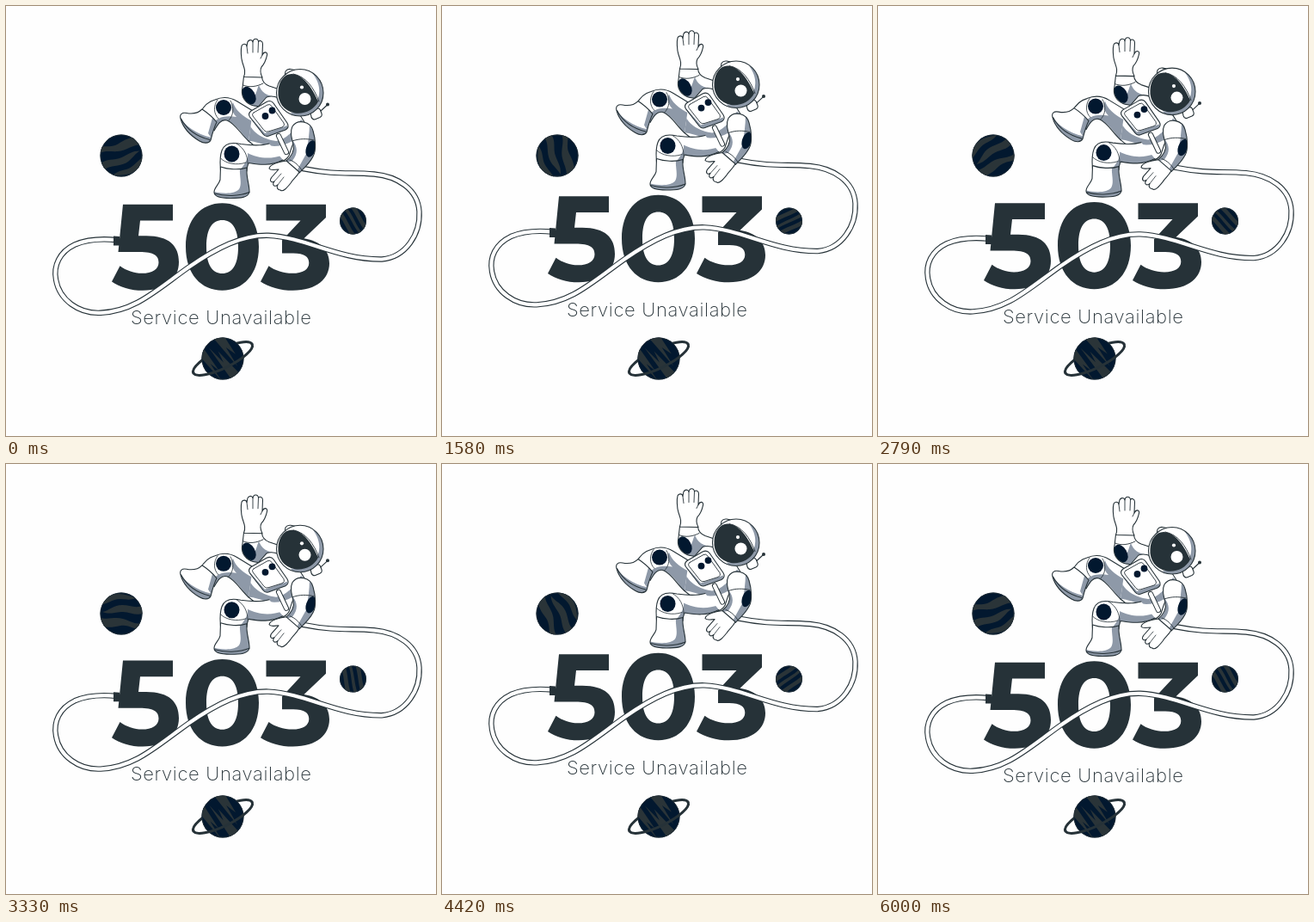
An HTML page with a canvas that plays this animation: 500 px wide and 500 px high, repeating every 6.04 s.

```html
<!DOCTYPE html>
<html lang="en">
<head>
<meta charset="utf-8">
<title>503</title>
<style>
html, body { margin: 0; width: 100%; height: 100%; overflow: hidden; background: #fefefe; }
canvas { display: block; width: 500px; height: 500px; }
</style>
</head>
<body>
<canvas id="stage"></canvas>
<script>
const canvas = document.getElementById('stage');
const ctx = canvas.getContext('2d');
const dpr = window.devicePixelRatio || 1;
canvas.width = canvas.height = 500 * dpr;

const LOOP = 6040, FLOAT = 3000, SPIN = 6000;
const INK = '#263238', NAVY = '#02182f', SHADE = '#8e99a8', WHITE = '#ffffff', PAPER = '#fefefe';
const TAU = Math.PI * 2, DEG = Math.PI / 180;

const cache = new Map();
function path(d) {
  if (!cache.has(d)) cache.set(d, new Path2D(d));
  return cache.get(d);
}

function fill(d, color) {
  ctx.fillStyle = color;
  ctx.fill(path(d), 'evenodd');
}

function line(d, width = 1.1, color = INK) {
  ctx.strokeStyle = color;
  ctx.lineWidth = width;
  ctx.stroke(path(d));
}

// White suit part with shading clipped to its outline; open paths stay unlined at the gap
function part(d, shade, inner) {
  fill(d, WHITE);
  ctx.save();
  ctx.clip(path(d));
  if (shade) fill(shade, SHADE);
  if (inner) inner();
  ctx.restore();
  line(d);
}

function oval(x, y, rx, ry, color, turn = 0) {
  ctx.beginPath();
  ctx.ellipse(x, y, rx, ry, turn * DEG, 0, TAU);
  ctx.fillStyle = color;
  ctx.fill();
}

function digits() {
  ctx.save();
  ctx.translate(0, 280);
  ctx.scale(1, 0.985);
  ctx.translate(0, -280);
  fill('M136 230H194V249H156L154 267H163C190 267 201 279 201 298C201 317 187 331.5 159 331.5C145 331.5 132 327.5 123 321L132.500 302.500C140 308 149 311.300 158 311.300C170 311.300 177.500 306.500 177.500 298.500C177.500 290.500 172.500 286 155 286H130.500Z', INK);
  fill('M251.500 228.500C276 228.500 294 247.500 294 280S276 331.500 251.500 331.500S209 312.500 209 280S227 228.500 251.500 228.500Z' +
       'M251.500 248.500C240.500 248.500 233 257.500 233 280S240.500 311.500 251.500 311.500S270 302.500 270 280S262.500 248.500 251.500 248.500Z', INK);
  fill('M302.500 230H372V245.500L346.500 270C366 273 376 284 376 299.500C376 317 362 331.500 333.500 331.500C319.500 331.500 305.500 327.500 296 321L305.500 302.500C313 308 322.500 311.300 333 311.300C345 311.300 352.300 306.700 352.300 299C352.300 291.500 347 287.500 334 287.500H321V272.500L342.500 249H302.500Z', INK);
  ctx.restore();
}

function caption() {
  ctx.font = '200 22px Inter, Lato, sans-serif';
  ctx.letterSpacing = '0.65px';
  ctx.textAlign = 'center';
  ctx.textBaseline = 'alphabetic';
  ctx.fillStyle = INK;
  ctx.fillText('Service Unavailable', 250.300, 370);
}

function cable() {
  const d = 'M128 272C112 270.500 95 271 80 277.500C62 286 55 302 58 318C62 342 85 358 110 356.800C150 355 175 330 212 304C245 281 275 266 305 266.800C350 269 385 295 437 294.500C465 292 482 265 480.500 239C479 213 455 198 428 195.500C400 193 385 197 345 189';
  line(d, 6.4);
  line(d, 4.2, WHITE);
  fill('M125 267.500L132 268V278.500H125Z', INK);
}

function raisedArm() {
  part('M276.500 82L297.500 82.500C298 88 301 91 306 93L321 98L309 118C300 116 292 118 285 115C276 111 273 103 275 95Z',
    'M278 112C290 112 291 98 294 92C297 100 303 105 316 106L312 121L278 118Z',
    () => oval(282.500, 104, 7, 11, NAVY, -30));
  part('M276.500 82.500C279 76 277 72 275 66C273 60 273 50 274 46.500C275 43.500 279.500 43.500 280 47L280.500 44C281 38.500 286.500 38.500 287 42C287.500 37 293 37 293.500 41.500C295 39.500 298.500 40.500 298.500 44L298 57C300 52.500 304.500 53 303.500 57.500C302 64 300 68 297 71C295 75 296 79 298 83Z');
  line('M280 47L281 55M287 42V54M293.500 41.500L293 54M298 57L296 61', 0.9);
  line('M275.500 92C283 95 291 94 299 90', 0.9);
}

function farLeg() {
  part('M287 122L269 111C261 106 252 105 243 109C235 111 230 116 226 124L242 145C246 138 250 131 257 133C267 137 273 149 282 157',
    'M264 112C267 122 277 130 291 136V164L278 153C271 142 262 134 255 133L243 145L239 140C244 128 257 127 268 129C263 124 261 118 264 112Z');
  oval(253, 118, 9, 9, NAVY);
  line('M246 109C241 116 241 125 247 131', 0.8);
  line('M261 110C266 119 264 128 259 133', 0.8);
  part('M228 120C234 124 240 129 245 135C242 141 240 148 238 156C236 160 230 160 225 157C215 151 206 142 203 131C201.500 125.500 205 123.500 210 124.500C218 126 223 125 228 120Z',
    'M202 129C208 139 221 149 239 153L237 164L219 160L201 140ZM240 130L247 132L239 154L235 148Z');
  line('M203.500 131C210 143 222 152 237 155.500');
}

function nearLeg() {
  part('M306 160C296 163 284 162 273 160.500C262 158 254 160 251 168C248 176 249 183 249.500 191L280 192C280 188 281 185 282 182.500C292 184 307 187 322 179',
    'M322 173C308 179 292 177 281 171C282 178 277 185 271 192H286L283 184L312 190L325 180Z');
  oval(262.500, 172, 9, 9.500, NAVY);
  line('M249.500 177C255 183 268 186 279 182', 0.8);
  line('M268 160C277 165 281 174 281 183', 0.8);
  part('M249.500 187C258 190 271 191 280 188C279 199 283 207 283 216C282 223 272 223.500 261 223.500C252 223.500 242 222.500 242 216.500C242 211 247.500 208 249 202Z',
    'M242 216C255 219 267 218 271 213C275 206 271 197 272 187H285V226H241Z');
  line('M242.500 218C254 221.500 271 221.500 283 216.500');
}

function torso() {
  part('M303 106C316 101 337 117 347 135C339 147 333 160 329 174C325 181 316 183 308 181C300 172 291 164 282 157C276 150 279 139 281 131Z',
    'M281 131C284 147 299 155 314 157C325 156 335 145 343 132L350 138L343 150C334 157 324 163 312 163C298 162 286 155 277 157Z');
}

function pack() {
  part('M285 122L303 111.500Q308 109 311 113L327 136Q330 141 325 144L307 150.500Q302 153 299 149L283.500 129Q281 125 285 122Z',
    'M284 129L301 148L327 139V153H300L280 131Z');
  line('M288 124L304 115Q307 113.500 309 116.500L323 136Q325 139 321 141L305 146Q302 147 300 144.500L287 128Q285.500 125.500 288 124Z', 0.9);
  oval(301.500, 128, 3.900, 3.900, NAVY);
  oval(309.500, 121.500, 3.900, 3.900, NAVY);
}

function helmet() {
  part('M324 82L325 76Q327 73 331 73.500L336 74.500L339 81Z');
  part('M354 124L361 119.500Q364 118 365.500 121L367 125Q368 128 365 129.500L359 132Q356 132 355 129Z');
  line('M366 122L373 115.500');
  oval(374, 114.500, 2, 2, INK);
  part('M342 73.500C357 73.500 369 86 369 101S357 128 342 128S314.500 116 314.500 101S327 73.500 342 73.500Z',
    'M357 79C371 98 364 118 343 124L331 124L337 132H372V86Z');
  fill('M332 79C345 79 356 95 363 111C358 121 347 126 336 124.500C323 122 315.500 112 316.500 99C317 88 323 79 332 79Z', INK);
  line('M334 79C349 82 358 95 364 111', 0.9);
  oval(347.500, 108, 7, 7, WHITE);
  oval(344, 94.500, 2.100, 2.100, WHITE);
}

function nearArm() {
  line('M317 151L326 170', 6.200);
  line('M317 151L326 170', 4.200, WHITE);
  part('M333 140C339 131 354 134 357 145C360 155 361 168 357 175C353 183 347 188 341 194L325 181C332 175 336 169 334 161C332 153 330 146 333 140Z',
    'M333 156C339 163 340 171 333 180L322 183L329 168ZM353 136C353 149 351 160 349 172L339 190L342 196L363 178V138Z',
    () => oval(354.500, 166, 5.500, 10, NAVY, 18));
  line('M333 157C341 154 350 154 358 156', 0.9);
  part('M326 180L341 193C338 199 334 201 331 206C327 211 322 217 319 214C316 214 314 211 316 208C312 211 309 208 312 204C308 206 306 203 309 199L317 190C313 190 308 192 306 189C307 184 317 181 326 180Z');
  line('M316 208L323 199M312 204L320 195', 0.8);
  line('M330 179C336 181 341 186 344 191', 0.9);
}

// Surface markings for a ball of radius 24.5
const FLAMES = [
  'M-27 -19C-17 -20 -9 -12 1 -14S16 -17 27 -13V-4C16 -8 8 -3 -2 -6S-17 -14 -27 -10Z',
  'M-27 1C-17 -4 -10 3 0 2S14 -1 22 2C13 4 9 10 -1 10S-17 5 -27 10Z',
  'M27 10C17 10 10 18 0 17S-10 16 -17 18C-9 21 0 25 10 22S19 17 27 18Z'
];
const LINES = [
  'M-27 -17C-12 -20 8 -14 27 -17V-9C10 -7 -10 -12 -27 -9Z',
  'M-27 -3C-10 -6 10 0 27 -3V2C10 5 -10 0 -27 3Z',
  'M-27 9C-10 7 10 12 27 9V17C10 19 -10 14 -27 17Z'
];
const SPIKES = [
  'M-27 -18L5 -15L-8 -11L18 -8L-27 -6Z',
  'M27 -5L-10 -1L4 2L-20 5L27 7Z',
  'M-27 10L8 12L-4 15L20 17L-27 20Z'
];

function ball(r, turn, marks) {
  ctx.save();
  ctx.beginPath();
  ctx.arc(0, 0, r, 0, TAU);
  ctx.fillStyle = NAVY;
  ctx.fill();
  ctx.clip();
  ctx.rotate(turn * DEG);
  ctx.scale(r / 24.5, r / 24.5);
  for (const d of marks) fill(d, '#2a3438');
  ctx.restore();
  ctx.beginPath();
  ctx.arc(0, 0, r - 0.4, 0, TAU);
  ctx.strokeStyle = INK;
  ctx.lineWidth = 0.8;
  ctx.stroke();
}

function planet(x, y, r, turn, marks) {
  ctx.save();
  ctx.translate(x, y);
  ball(r, turn, marks);
  ctx.restore();
}

function ring(from, to) {
  ctx.beginPath();
  ctx.ellipse(0, 0, 38, 11, -26 * DEG, from, to);
  ctx.strokeStyle = INK;
  ctx.lineWidth = 3;
  ctx.stroke();
}

function ringed(t) {
  ctx.save();
  ctx.translate(252, 410);
  ring(Math.PI, TAU);
  ball(24.5, 52 + 3 * Math.sin(t / FLOAT * TAU), SPIKES);
  ring(0, Math.PI);
  ctx.restore();
}

function draw(t) {
  ctx.setTransform(dpr, 0, 0, dpr, 0, 0);
  ctx.fillStyle = PAPER;
  ctx.fillRect(0, 0, 500, 500);
  ctx.lineJoin = ctx.lineCap = 'round';

  const spin = t / SPIN * 360;
  planet(134, 174, 24.5, spin - 20, FLAMES);
  planet(403.5, 250, 15.5, spin + 58, LINES);
  ringed(t);

  const half = (t % FLOAT) / (FLOAT / 2);
  ctx.translate(0, -10 * (half < 1 ? half : 2 - half));
  digits();
  caption();
  cable();
  raisedArm();
  torso();
  farLeg();
  nearLeg();
  pack();
  helmet();
  nearArm();
}

const start = performance.now();
function tick() {
  draw((performance.now() - start) % LOOP);
  requestAnimationFrame(tick);
}
tick();
</script>
</body>
</html>
```
